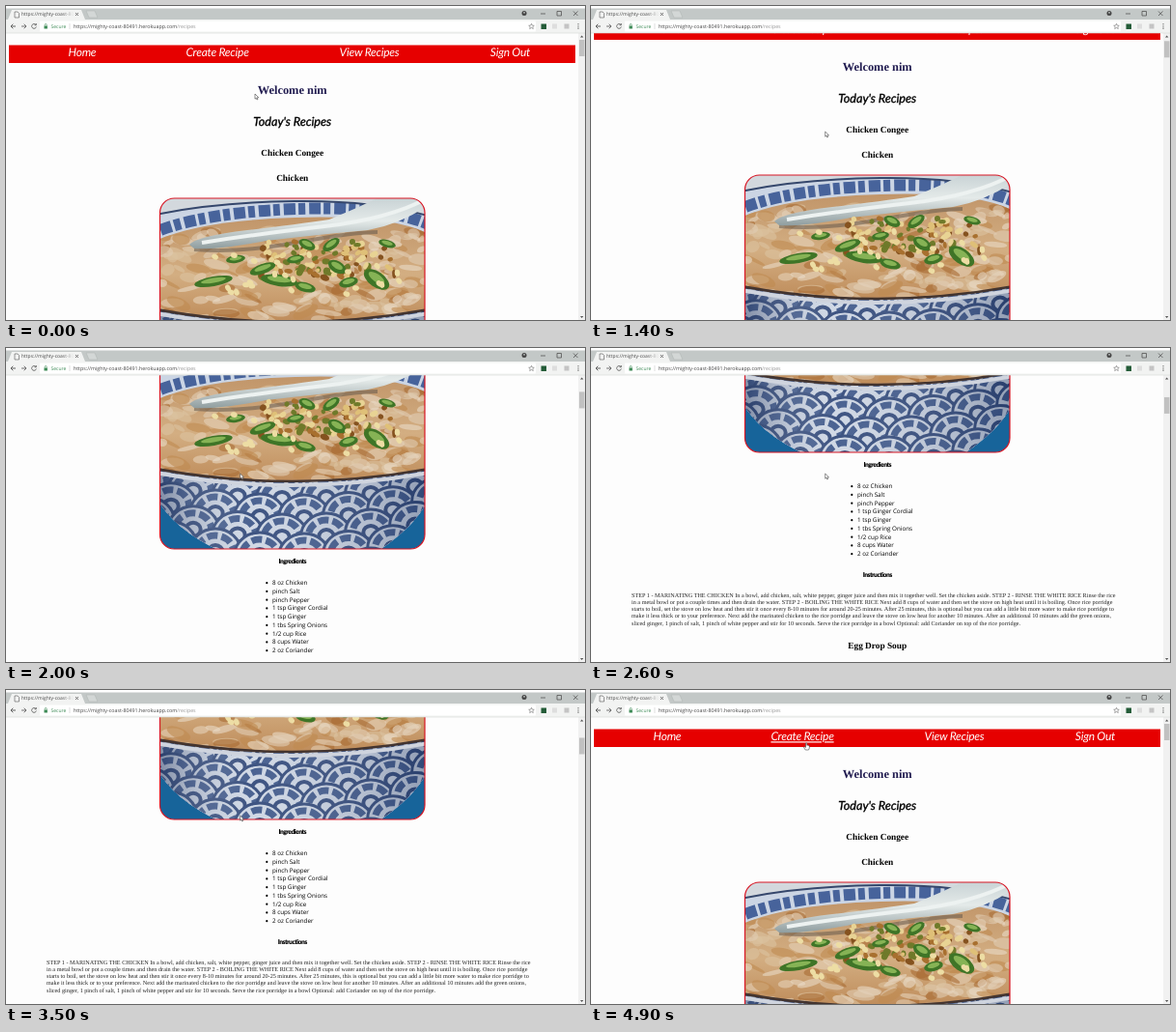
An HTML page that plays this animation: 600 px wide and 325 px high, repeating every 5000 ms.

```html
<!DOCTYPE html>
<html lang="en">
<head>
<meta charset="utf-8">
<title>Recipes</title>
<style>
  html, body { margin: 0; width: 100%; height: 100%; overflow: hidden; background: #fdfdfd; }
  svg { display: block; width: 600px; height: 325px; text-rendering: geometricPrecision; }
  .mid { text-anchor: middle; }
  .serif { font-family: "Liberation Serif", serif; }
  .bold { font-weight: 700; font-size: 9.3px; }
  .hand { font: italic 12px Lato, sans-serif; }
  .nav { fill: #fff; letter-spacing: -.25px; }
  .title { font-size: 12.6px; stroke: #000; stroke-width: .35; }
  .label { font: 900 6.8px Lato, sans-serif; letter-spacing: -.55px; }
  .list { font: 6.25px "Open Sans", sans-serif; }
  .ui { font: 5px "Open Sans", sans-serif; fill: #444; }
  .url { font-size: 5.3px; }
  .line { fill: none; stroke: #555; }
</style>
</head>
<body>
<svg viewBox="0 0 600 325">
  <defs>
    <clipPath id="photoClip"><rect x="159.5" y="199" width="274.5" height="198" rx="15"/></clipPath>
    <clipPath id="bowlClip"><path d="M155 314Q296 342 438 314V345Q424 374 384 400H224Q172 376 155 342Z"/></clipPath>
    <clipPath id="soupClip"><path d="M155 243Q200 222 300 219T438 236V315Q296 343 155 315Z"/></clipPath>
    <linearGradient id="shade">
      <stop offset="0" stop-color="#14264f" stop-opacity=".5"/>
      <stop offset=".35" stop-color="#fff" stop-opacity=".08"/>
      <stop offset="1" stop-color="#14264f" stop-opacity=".35"/>
    </linearGradient>
    <linearGradient id="soup" x2="0" y2="1">
      <stop offset="0" stop-color="#c09468"/>
      <stop offset=".5" stop-color="#d3ae82"/>
      <stop offset="1" stop-color="#b98350"/>
    </linearGradient>
    <linearGradient id="spoon" x2="0" y2="1">
      <stop offset="0" stop-color="#c3ced1"/>
      <stop offset=".5" stop-color="#e4eae9"/>
      <stop offset="1" stop-color="#8f9d9f"/>
    </linearGradient>
    <linearGradient id="fade" gradientUnits="userSpaceOnUse" x1="58" x2="70">
      <stop stop-color="#444"/>
      <stop offset="1" stop-color="#444" stop-opacity="0"/>
    </linearGradient>
    <filter id="soft"><feGaussianBlur stdDeviation=".7"/></filter>
  </defs>

  <g id="page">
    <rect x="3" y="40.5" width="587" height="18.5" fill="#e60000"/>
    <g class="hand nav mid">
      <text x="79" y="52.3">Home</text>
      <text x="219" y="52.3" id="create">Create Recipe</text>
      <text x="376.5" y="52.3">View Recipes</text>
      <text x="522.5" y="52.3">Sign Out</text>
    </g>
    <g class="mid">
      <text class="serif" x="296.7" y="90.5" font-size="12.4" font-weight="700" fill="#211c50">Welcome nim</text>
      <text class="hand title" x="296.7" y="123.6">Today's Recipes</text>
      <g class="serif bold">
        <text x="296.7" y="155">Chicken Congee</text>
        <text x="296.7" y="181">Chicken</text>
        <text x="296.7" y="600">Egg Drop Soup</text>
      </g>
      <text class="label" x="296.7" y="411.5">Ingredients</text>
      <text class="label" x="296.7" y="526.3">Instructions</text>
    </g>
    <g clip-path="url(#photoClip)"><g filter="url(#soft)">
      <rect x="150" y="190" width="294" height="216" fill="#d3d8dd"/>
      <path d="M150 330H444V406H150Z" fill="#17649a"/>
      <path d="M150 218Q215 203 300 203T444 220V262H150Z" fill="#cbd5e4"/>
      <path d="M150 236Q200 214 300 210T444 229" fill="none" stroke="#47639b" stroke-width="12" stroke-dasharray="7 4 12 3"/>
      <path d="M150 217Q215 203 300 202T444 219" fill="none" stroke="#35476c" stroke-width="2"/>
      <g clip-path="url(#soupClip)">
        <rect x="155" y="215" width="284" height="125" fill="url(#soup)"/>
        <g id="rice"></g>
      </g>
      <path d="M195 252Q240 256 300 245T385 234" fill="none" stroke="#6f5f50" stroke-width="4" opacity=".6"/>
      <path d="M190 247Q198 238 250 232T335 221Q365 209 395 194H444V202Q410 226 375 232Q320 237 270 243Q215 253 195 251Z" fill="url(#spoon)"/>
      <path d="M203 245Q260 236 330 228T440 197" fill="none" stroke="#edf2f1" stroke-width="4"/>
      <g id="topping"></g>
      <g clip-path="url(#bowlClip)">
        <rect x="150" y="310" width="294" height="95" fill="#c1cbdc"/>
        <g id="scallops"></g>
        <rect x="150" y="310" width="294" height="95" fill="url(#shade)"/>
      </g>
      <path d="M150 317Q296 345 444 317" fill="none" stroke="#cfd4de" stroke-width="4"/>
      <path d="M150 313Q296 341 444 313" fill="none" stroke="#43342f" stroke-width="2.5"/>
    </g></g>
    <rect x="159.5" y="199" width="274.5" height="198" rx="15" fill="none" stroke="#d81624" stroke-width="1.2"/>
    <g id="list" class="list"></g>
    <g id="steps" class="serif" font-size="6.2" fill="#222"></g>
  </g>

  <g id="scrollbar">
    <rect x="593" y="28" width="7" height="297" fill="#f1f1f1"/>
    <path d="M595 32.5l1.7-2 1.7 2zM595 321l1.7 2 1.7-2z" fill="#555"/>
    <rect id="thumb" x="594" y="35" width="5.5" height="17" fill="#c1c1c1"/>
  </g>

  <g id="browser" class="ui">
    <rect width="600" height="28" fill="#f2f3f2"/>
    <rect width="600" height="3" fill="#fff"/>
    <rect y="2.5" width="600" height="11.5" fill="#c3c8c7"/>
    <path d="M2 14L6 4H78L82 14Z" fill="#f2f3f2"/>
    <path d="M83 5H92L95 12H86Z" fill="#d3d7d6" stroke="#adb2b1" stroke-width=".5"/>
    <path class="line" d="M9 6h3l1.5 1.5V12H9z" stroke-width=".6"/>
    <text id="tabTitle" x="16" y="10.4" style="fill:url(#fade)"></text>
    <path class="line" d="M72 7l3 3m0-3l-3 3" stroke-width=".8"/>
    <circle cx="537" cy="7.5" r="2.5" fill="#444"/>
    <circle cx="537" cy="6.8" r=".9" fill="#c3c8c7"/>
    <path class="line" d="M554 8h5M571 5.5h4.5v4.5h-4.5zM588 5.5l4.5 4.5m0-4.5l-4.5 4.5" stroke-width=".8"/>
    <rect x="35" y="15.5" width="514" height="11" rx="1" fill="#fff"/>
    <path class="line" d="M10 21H5m2.3-2.3L5 21l2.3 2.3" stroke-width=".9"/>
    <path class="line" d="M16 21h5m-2.3-2.3L21 21l-2.3 2.3" stroke-width=".8"/>
    <path class="line" d="M31 19.5a2.4 2.4 0 1 0 .4 2M31.3 18v1.8h-1.8" stroke-width=".8"/>
    <path d="M39.5 20.5h3.4v3h-3.4z" fill="#3c8a55"/>
    <path d="M40.2 20.5v-1a1 1 0 0 1 2 0v1" fill="none" stroke="#3c8a55" stroke-width=".6"/>
    <text x="46.5" y="23" fill="#3c8a55">Secure</text>
    <path d="M66 18v6" stroke="#ccc" stroke-width=".6"/>
    <text id="address" class="url" x="70" y="23"></text>
    <path class="line" d="M544.5 18.3l.8 1.8 2 .2-1.5 1.3.5 2-1.8-1.1-1.8 1.1.5-2-1.5-1.3 2-.2z" stroke-width=".5"/>
    <rect x="554.5" y="18.5" width="5.5" height="5.5" fill="#245c38"/>
    <rect x="566" y="18.5" width="5" height="5" fill="#dedede"/>
    <rect x="578.5" y="18.5" width="5" height="5" fill="#c4c4c4"/>
    <path d="M593 18.2v6" stroke="#555" stroke-width="1.1" stroke-dasharray="1.1 1.1"/>
    <path d="M0 28H600" stroke="#d5d7d6" stroke-width=".6"/>
  </g>

  <g id="cursor" stroke="#444" stroke-width=".6" fill="#fff">
    <path id="arrow" d="M0 0V5.2L1.2 4.2 2 6 2.9 5.6 2.1 3.8H3.8Z"/>
    <path id="pointer" d="M0 .5Q.7-.4 1.3.5V2.8Q2.5 2.2 3.8 3.4V5.6L3 7.5H-.3L-2 4.8Q-1.6 3.7 0 5Z"/>
  </g>
</svg>

<script>
const $ = id => document.getElementById(id);

let seed = 7;
const random = (min, max) => {
  seed = (seed * 16807) % 2147483647;
  return min + (max - min) * seed / 2147483647;
};
const pick = items => items[Math.floor(random(0, items.length))];
const repeat = (count, make) => Array.from({ length: count }, (_, i) => make(i)).join('');
const blob = (x, y, rx, ry, angle, attrs) =>
  `<ellipse rx="${rx}" ry="${ry}" transform="translate(${x} ${y}) rotate(${angle})" ${attrs}/>`;

// Browser text
const scheme = 'https', host = 'mighty-coast-80491.herokuapp.com';
$('tabTitle').textContent = `${scheme}://${host.slice(0, 15)}`;
$('address').innerHTML = `${scheme}://${host}<tspan fill="#999">/recipes</tspan>`;

// Recipe text
const ingredients = ['8 oz Chicken', 'pinch Salt', 'pinch Pepper', '1 tsp Ginger Cordial', '1 tsp Ginger',
  '1 tbs Spring Onions', '1/2 cup Rice', '8 cups Water', '2 oz Coriander'];
$('list').innerHTML = ingredients.map((item, i) => {
  const y = 434.2 + i * 8.75;
  return `<circle cx="270.3" cy="${y - 2}" r="1.1"/><text x="276" y="${y}">${item}</text>`;
}).join('');

const steps = [
  'STEP 1 - MARINATING THE CHICKEN In a bowl, add chicken, salt, white pepper, ginger juice and then mix it together well. Set the chicken aside. STEP 2 - RINSE THE WHITE RICE Rinse the rice',
  'in a metal bowl or pot a couple times and then drain the water. STEP 2 - BOILING THE WHITE RICE Next add 8 cups of water and then set the stove on high heat until it is boiling. Once rice porridge',
  'starts to boil, set the stove on low heat and then stir it once every 8-10 minutes for around 20-25 minutes. After 25 minutes, this is optional but you can add a little bit more water to make rice porridge to',
  'make it less thick or to your preference. Next add the marinated chicken to the rice porridge and leave the stove on low heat for another 10 minutes. After an additional 10 minutes add the green onions,',
  'sliced ginger, 1 pinch of salt, 1 pinch of white pepper and stir for 10 seconds. Serve the rice porridge in a bowl Optional: add Coriander on top of the rice porridge.'
];
$('steps').innerHTML = steps.map((line, i) => `<text x="42" y="${547 + i * 7.13}">${line}</text>`).join('');

// Congee photo
$('rice').innerHTML = repeat(190, () =>
  blob(random(158, 436), random(232, 330), random(5, 15), random(2, 6), random(-30, 30),
    `fill="${pick(['#e6d3ba', '#dcc3a0', '#e9dac6', '#e2cdb4', '#c08a50', '#a96b32'])}" opacity=".6"`));

const onions = [[215, 285, 20, 5, -10], [283, 284, 19, 6, 8], [266, 272, 14, 5, -20], [312, 247, 9, 5, 25],
  [337, 247, 10, 5, -35], [343, 270, 10, 6, 30], [384, 283, 15, 8, 35], [355, 286, 10, 5, -15],
  [300, 262, 9, 4, -10], [395, 246, 9, 4, 15], [238, 262, 10, 4, -8], [310, 291, 11, 5, 15]];
$('topping').innerHTML =
  repeat(110, () => blob(random(-55, 55) + random(-35, 35) + 325, random(244, 282), random(2, 5), random(1.8, 3.4),
    random(0, 180), `fill="${pick(['#e8d394', '#dfc078', '#a8702f', '#85521f', '#6f7a2a'])}"`)) +
  onions.map(([x, y, rx, ry, angle]) =>
    blob(x, y, rx, ry, angle, 'fill="#3f7527"') +
    blob(x, y - ry * .2, rx * .65, ry * .5, angle, 'fill="#86b355"')).join('') +
  repeat(24, () => blob(random(215, 410), random(250, 302), 3.5, 2.7, random(0, 90), 'fill="#eddda4"'));

// Overlapping fans, bent to follow the rim
const ring = (x, y, r, attrs) => `<ellipse cx="${x}" cy="${y}" rx="${r * 1.1}" ry="${r}" ${attrs}/>`;
const fan = (x, y) =>
  ring(x, y, 24, 'fill="#ccd5e3" stroke="#2d4577" stroke-width="3"') +
  ring(x, y, 17, 'fill="none" stroke="#3b5588" stroke-width="7" stroke-dasharray="11 4"') +
  ring(x, y, 7, 'fill="#ccd5e3" stroke="#2d4577" stroke-width="4"');
$('scallops').innerHTML = repeat(5, row => repeat(8, col => {
  const x = 148 + col * 46 + row % 2 * 23;
  return fan(x, 345 + row * 20 - ((x - 297) / 36) ** 2);
}));

// Motion
const LOOP = 5000, STEP = 100;
const along = (keys, t) => {
  const i = keys.findIndex(([time]) => time > t);
  if (i < 0) return keys.at(-1)[1];
  if (i === 0) return keys[0][1];
  const [[t0, a], [t1, b]] = [keys[i - 1], keys[i]];
  return a + (b - a) * (t - t0) / (t1 - t0);
};
const scrollKeys = [[1300, 0], [1400, 24], [2000, 189], [2600, 289], [2750, 312], [3400, 312], [3500, 263], [3800, 0]];
const cursorX = [[0, 258], [600, 242.7], [4000, 242.7], [4800, 222.5]];
const cursorY = [[0, 91], [600, 130], [4000, 130], [4800, 54.5]];

function draw(now) {
  const t = Math.floor(now % LOOP / STEP) * STEP;
  const scroll = along(scrollKeys, t), x = along(cursorX, t), y = along(cursorY, t);
  const hover = y < 59;
  $('page').setAttribute('transform', `translate(0 ${-scroll})`);
  $('thumb').setAttribute('y', 35 + scroll * .055);
  $('cursor').setAttribute('transform', `translate(${x} ${y})`);
  $('arrow').style.display = hover ? 'none' : '';
  $('pointer').style.display = hover ? '' : 'none';
  $('create').style.textDecoration = hover ? 'underline' : 'none';
}

let start;
function tick(now) {
  start ??= now;
  draw(now - start);
  requestAnimationFrame(tick);
}
draw(0);
requestAnimationFrame(tick);
</script>
</body>
</html>
```
